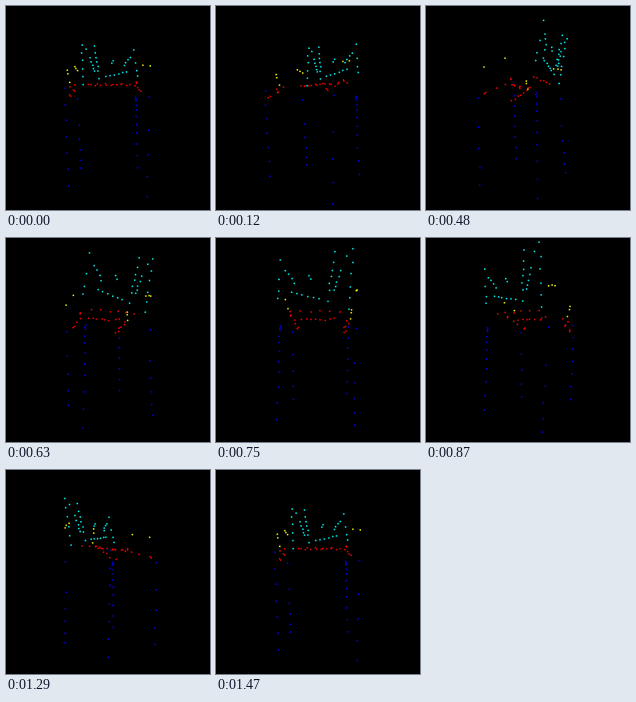
A matplotlib script that plays this animation: 256 by 256 pixels, repeating every 1500 ms.

```python
import numpy as np
import matplotlib.pyplot as plt
from matplotlib.animation import FuncAnimation

SIZE, FRAMES, STEP_MS = 256, 50, 30
CENTER = SIZE / 2
FOCAL = CENTER / np.tan(np.radians(30))  # 60 degree field of view
CYAN, YELLOW, RED, BLUE = "#00ffff", "#ffff00", "#ff0000", "#0000ff"
rng = np.random.default_rng(4)


def strip(start, end, count, power=1, jitter=(.7, .7, .004)):
    """Scatter dots along a bar; a power above 1 crowds them at the start.

    Ends are front-view pixels and a depth relative to the camera distance.
    """
    t = np.linspace(0, 1, count)[:, None] ** power
    bar = np.array(start) + t * (np.array(end) - np.array(start))
    return bar + rng.uniform(-1, 1, bar.shape) * jitter


def lean(u, v):
    """Point on the backrest, which tilts away with height."""
    return u, v, .1 + .00093 * (CENTER - v)


def slat(start, end, count, power=1):
    return strip(lean(*start), lean(*end), count, power)


def unproject(points):
    u, v, z = points.T
    return np.array([(u - CENTER) * (1 + z), (v - CENTER) * (1 + z), z * FOCAL]) / FOCAL


def project(cloud, angle):
    x, y, z = cloud
    c, s = np.cos(angle), np.sin(angle)
    depth = 1 + z * c - x * s
    u = CENTER + FOCAL * (x * c + z * s) / depth
    v = CENTER + FOCAL * y / depth
    return u, v, depth


back = [
    slat((95, 49), (97, 98), 6),              # left post
    slat((101, 54), (111, 82), 6, .6),
    slat((111, 50), (116, 81), 6, .8),
    slat((134, 69), (133, 71), 2),
    slat((156, 64), (148, 75), 4),
    slat((160, 55), (165, 88), 4, .6),        # right post
    slat((117, 91), (151, 83), 7, .8),        # lower rail
]
arms = [
    strip((80, 96, -.104), (77, 80, -.122), 3, .6),
    strip((86, 76, .085), (90, 81, .130), 3),
    strip((172, 74, -.023), (181, 75, -.141), 2),
]
rough = (1, 1, .03)
seat = [
    strip((104, 98, .08), (155, 98, .10), 6),                  # rear edge
    strip((106, 99, -.05), (151, 99, -.05), 8, jitter=rough),  # middle
    strip((84, 98, -.10), (82, 114, -.21), 6, jitter=(4, 1, .01)),
    strip((162, 95, .01), (167, 107, -.21), 6, jitter=(3, 1, .03)),
]
legs = [
    strip((74, 103, -.212), (78, 225, -.191), 7),
    strip((90, 117, .128), (94, 204, .163), 6, .6),
    strip((180, 114, -.200), (177, 240, -.190), 5, .8),
    strip((163, 115, .135), (165, 203, .146), 11, 1.9),
]

parts = [(back, CYAN), (arms, YELLOW), (seat, RED), (legs, BLUE)]
cloud = unproject(np.vstack([bar for bars, _ in parts for bar in bars]))
colors = np.array([color for bars, color in parts for bar in bars for _ in bar])

fig = plt.figure(figsize=(4, 4), dpi=SIZE / 4, facecolor="black")
ax = fig.add_axes([0, 0, 1, 1])
ax.set_xlim(0, SIZE)
ax.set_ylim(SIZE, 0)
ax.axis("off")

DOT = 2.0 * 72 / fig.dpi
dots = ax.scatter(cloud[0], cloud[1], s=DOT ** 2, c=colors, linewidths=0)


def draw(frame):
    # The last frame closes the turn, so it equals the first.
    u, v, depth = project(cloud, 2 * np.pi * frame / (FRAMES - 1))
    order = np.argsort(-depth)  # far dots first
    dots.set_offsets(np.column_stack([u, v])[order])
    dots.set_facecolor(colors[order])
    return dots,


anim = FuncAnimation(fig, draw, frames=FRAMES, interval=STEP_MS,
                     repeat=True, repeat_delay=0)
plt.show()
```
